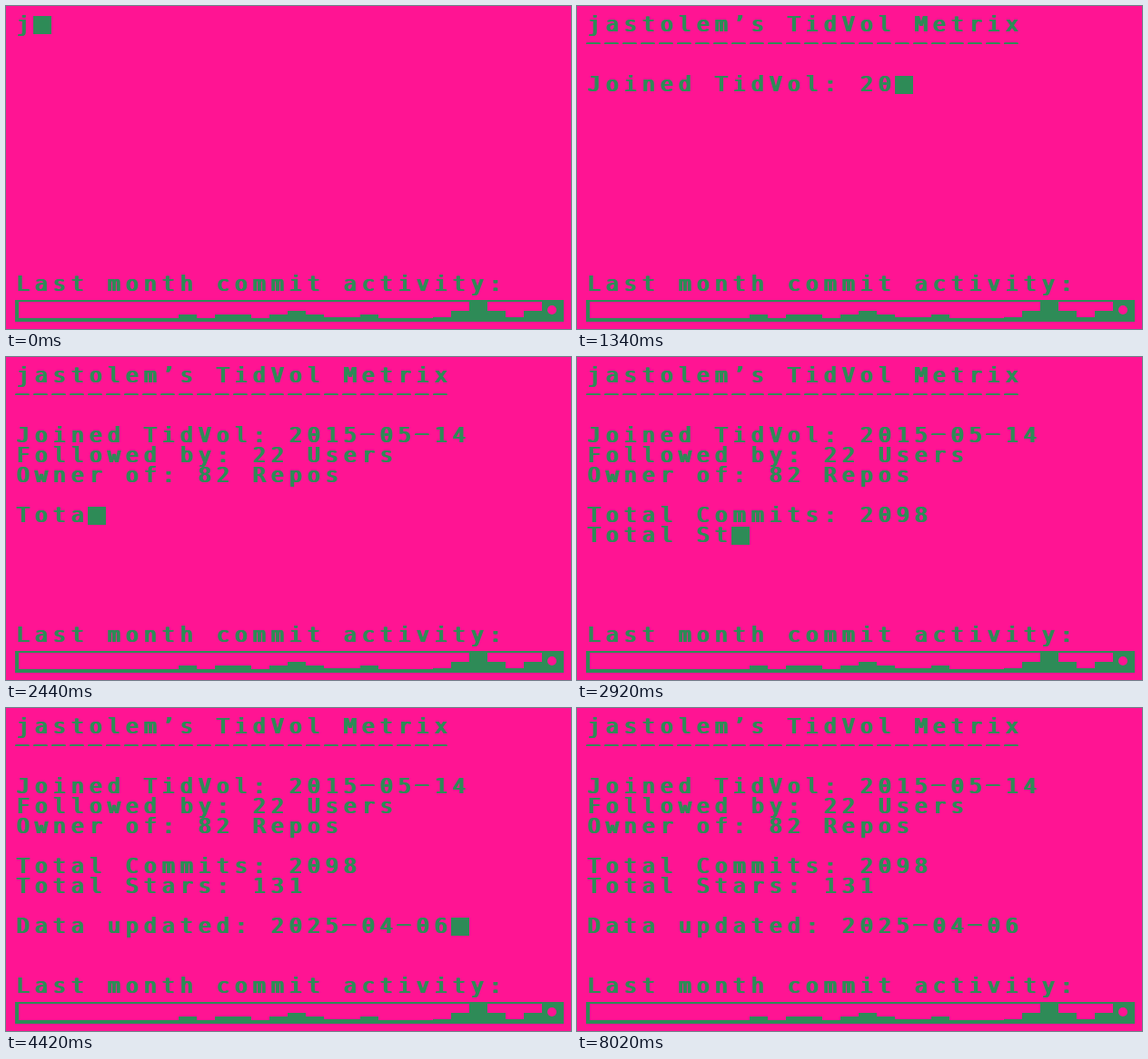
Write an HTML page that moves like this. It is 622 px wide and 356 px high and loops after 8420 ms.

```html
<!DOCTYPE html>
<html lang="en">
<head>
<meta charset="utf-8">
<title>Commit metrics</title>
<style>
  :root { --bg: #ff1493; --ink: #2e8b57; }
  html, body { margin: 0; width: 100%; height: 100%; overflow: hidden; background: var(--bg); }
  #stage { position: relative; width: 622px; height: 356px; overflow: hidden; }
  pre {
    position: absolute; left: 11px; top: 9px; margin: 0;
    color: var(--ink);
    font: 23px/22px "DejaVu Sans Mono", monospace;
    letter-spacing: calc(20px - 1ch);
    font-variant-ligatures: none;
    text-shadow: 1px 0 var(--ink), 2px 0 var(--ink);
  }
  pre i { position: relative; left: -1px; top: -2px; font-style: normal; }
  #caption { top: 295px; }
  #cursor { position: absolute; left: 10px; top: 11px; width: 20px; height: 20px; background: var(--ink); }
  svg { position: absolute; left: 0; top: 0; }
</style>
</head>
<body>
<div id="stage">
  <svg width="622" height="356" fill="#2e8b57" shape-rendering="crispEdges">
    <path d="M10 324H614V348H10Z M14 326V344H610V326Z" fill-rule="evenodd"/>
    <g id="bars"></g>
    <circle cx="601" cy="335" r="5" fill="#ff1493" shape-rendering="auto"/>
  </svg>
  <pre id="text"></pre>
  <pre id="caption">Last month commit activity:</pre>
  <div id="cursor"></div>
</div>
<script>
  const LOOP = 8420, STEP = 20, BLINK = 400, CELL = 20, ROW = 22;
  const script = [
    "jastolem’s TidVol Metrix",
    "-".repeat(24),
    "",
    "Joined TidVol: 2015-05-14",
    "Followed by: 22 Users",
    "Owner of: 82 Repos",
    "",
    "Total Commits: 2098",
    "Total Stars: 131",
    "",
    "Data updated: 2025-04-06"
  ].join("\n");
  const typedAt = script.length * STEP;

  const text = document.getElementById("text");
  const cursor = document.getElementById("cursor");

  // Bars as [first day, days, height]
  const bars = [
    [9, 1, 8], [11, 2, 8], [14, 1, 8], [15, 1, 12], [16, 1, 8], [17, 2, 5], [19, 1, 8],
    [23, 1, 5], [24, 1, 12], [25, 1, 24], [26, 1, 12], [27, 1, 5], [28, 1, 12], [29, 1, 24]
  ];
  document.getElementById("bars").innerHTML = bars.map(([day, span, h]) =>
    `<rect x="${10 + day * CELL}" y="${348 - h}" width="${span * CELL}" height="${h}"/>`).join("");

  let shown = -1;

  function type(count) {
    if (count === shown) return;
    shown = count;
    const part = script.slice(0, count);
    const lines = part.split("\n");
    const row = lines.length - 1;
    text.innerHTML = part.replace(/-/g, "<i>–</i>");
    cursor.style.transform = `translate(${lines[row].length * CELL}px, ${row * ROW}px)`;
  }

  function draw(now) {
    const t = Math.max(0, now) % LOOP;
    type(Math.min(script.length, Math.floor(t / STEP) + 1));
    const off = t >= typedAt && Math.floor((t - typedAt) / BLINK) % 2 === 1;
    cursor.style.visibility = off ? "hidden" : "visible";
  }

  function tick() {
    draw(performance.now());
    requestAnimationFrame(tick);
  }
  tick();
</script>
</body>
</html>
```
